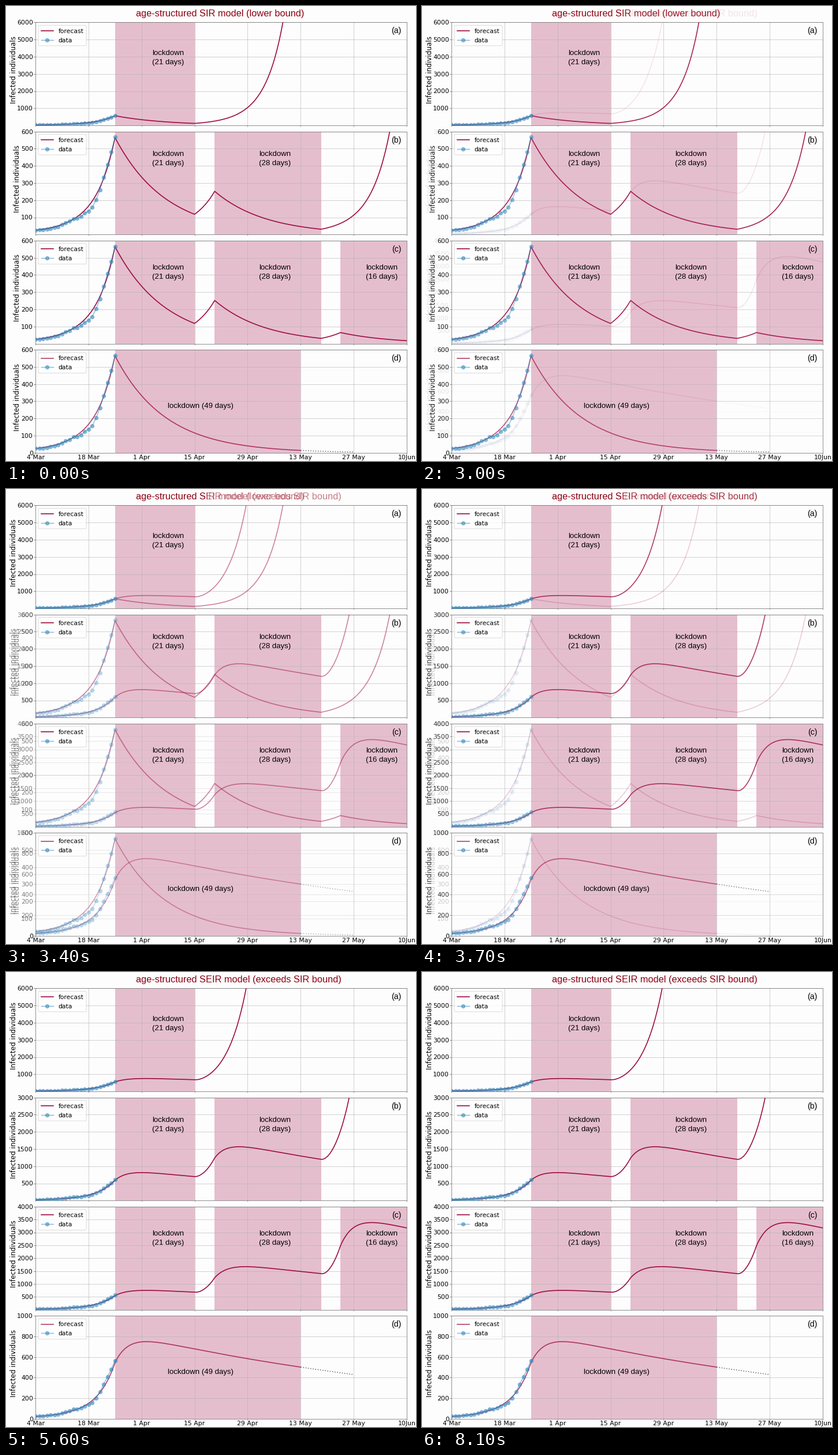
Recreate the animation shown at these times as a matplotlib script. Size 710 by 789 pixels, loop 8200 ms.

```python
import numpy as np
import matplotlib.pyplot as plt
from matplotlib.animation import FuncAnimation
from matplotlib.patches import FancyBboxPatch

W, H, DPI = 710, 789, 100
PT = 72 / DPI  # points per pixel
LEFT, RIGHT, DAYS = 51, 694, 98
FIRST_TOP, PANEL_STEP, PANEL_H = 28.4, 189.25, 178.7
FRAMES, INTERVAL = 82, 100
FADE_START, FADE_TIME = 2900, 1000

RED, BLUE, PINK, PAPER = "#9c0c40", "#3288bd", "#e5becd", "#fefdfe"
GRID, EDGE = "#b0b0b0", "#757575"
SANS, DEJAVU = "Liberation Sans", "DejaVu Sans"
LINE_W, DATA_W, DOT, DATA_ALPHA = 1.65 * PT, 1.4 * PT, 6.4 * PT, 0.58
CASES = np.array([25, 27, 28, 31, 36, 41, 46, 57, 69, 77, 93, 94, 105, 124,
                  137, 158, 203, 260, 333, 408, 480, 567])

fig = plt.figure(figsize=(W / DPI, H / DPI), dpi=DPI, facecolor=PAPER)
fading = []


def fade(artist, model, alpha=1.0):
    """Register an artist of model 0 or 1; None means it is always shown."""
    artist.set_alpha(alpha)
    if model is not None:
        fading.append((artist, model, alpha))
    return artist


def label(x, y, text, size, font=DEJAVU, ha="center", color="black"):
    """Text whose capitals are centred on pixel row y, counted from the top."""
    return fig.text(x / W, 1 - (y + 0.36 * size) / H, text, fontsize=size * PT,
                    family=font, ha=ha, va="baseline", color=color)


# --- model curves -----------------------------------------------------------
def log_bend(t, span, v0, v1, bend=0.0):
    return v0 * np.exp(np.log(v1 / v0) * t / span + bend * t * (t - span))


def two_rates(t, span, v0, v1, slow, fast):
    e1, e2 = np.exp(slow * span), np.exp(-fast * span)
    p = (v1 - v0 * e2) / (e1 - e2)
    return p * np.exp(slow * t) + (v0 - p) * np.exp(-fast * t)


def curve(days, values, phase):
    xs, ys = [], []
    for i in range(len(days) - 1):
        span = days[i + 1] - days[i]
        t = np.linspace(0, span, 80)
        xs.append(days[i] + t)
        ys.append(phase(i, t, span, values[i], values[i + 1]))
    return np.concatenate(xs), np.concatenate(ys)


def sir(days, values):
    def phase(i, t, span, v0, v1):
        growth_bend = 0.0014 if i else 0.0019
        return log_bend(t, span, v0, v1, growth_bend if v1 > v0 else 0)
    return curve(days, values, phase)


def seir(days, values, locked=(-0.0108, 0.28), free=(0.19, 0.42)):
    def phase(i, t, span, v0, v1):
        if i == 0:
            return log_bend(t, span, v0, v1, 0.0022)
        return two_rates(t, span, v0, v1, *(locked if i % 2 else free))
    return curve(days, values, phase)


# --- panels -----------------------------------------------------------------
D1, D2, D3, D4, D5 = 21, 42, 47.3, 75.4, 80.5
FIRST, SECOND, THIRD = (D1, D2), (D3, D4), (D5, DAYS)

PANELS = [
    dict(name="(a)", scales=[(6000, 1000), (6000, 1000)],
         spans=[FIRST],
         curves=[sir([0, D1, D2, 65.3], [25, 565, 118, 6000]),
                 seir([0, D1, D2, 55.6], [22, 555, 680, 6000])],
         notes=[(280.8, "lockdown", 52), (280.8, "(21 days)", 68)]),
    dict(name="(b)", scales=[(600, 100), (3000, 500)],
         spans=[FIRST, SECOND],
         curves=[sir([0, D1, D2, D3, D4, 93.5], [25, 565, 118, 252, 31, 600]),
                 seir([0, D1, D2, D3, D4, 82.8],
                      [23, 590, 697, 1240, 1200, 3000],
                      (-0.0145, 0.31), (0.18, 0.36))],
         notes=[(280.8, "lockdown", 37.5), (280.8, "(21 days)", 53.5),
                (465.5, "lockdown", 37.5), (465.5, "(28 days)", 53.5)]),
    dict(name="(c)", scales=[(600, 100), (4000, 500)],
         spans=[FIRST, SECOND, THIRD],
         curves=[sir([0, D1, D2, D3, D4, D5, DAYS],
                     [25, 565, 118, 252, 31, 65, 17.5]),
                 seir([0, D1, D2, D3, D4, D5, DAYS],
                      [22, 545, 680, 1240, 1400, 2480, 3173])],
         notes=[(280.8, "lockdown", 45), (280.8, "(21 days)", 61),
                (465.5, "lockdown", 45), (465.5, "(28 days)", 61),
                (650.5, "lockdown", 45), (650.5, "(16 days)", 61)]),
    dict(name="(d)", scales=[(600, 100), (1000, 200)],
         spans=[(D1, 70)],
         curves=[sir([0, D1, 70], [25, 565, 14]),
                 seir([0, D1, 70], [22, 545, 502])],
         notes=[(337, "lockdown (49 days)", 96.3)]),
]
TAILS = [(14, 5), (502, 430)]


def draw_scale(ax, panel, top):
    """Horizontal grid, ticks and numbers; parts common to both models stay."""
    marks = []
    for limit, step in panel["scales"]:
        start = 0 if panel["name"] == "(d)" else step
        marks.append({(round(v / limit, 4), str(v))
                      for v in range(start, limit + 1, step)})
    places = [{f for f, _ in m} for m in marks]

    for f in places[0] | places[1]:
        model = None if f in places[0] & places[1] else int(f in places[1])
        grid, = ax.plot([0, DAYS], [f, f], color=GRID, lw=0.8 * PT,
                        zorder=1.5)
        tick, = ax.plot([-0.4, 0], [f, f], color=EDGE, lw=0.8 * PT,
                        clip_on=False, zorder=2.4)
        fade(grid, model, 0.7)
        fade(tick, model)
    for f, number in marks[0] | marks[1]:
        shared = (f, number) in marks[0] & marks[1]
        model = None if shared else int((f, number) in marks[1])
        y = top + PANEL_H * (1 - f)
        fade(label(47, y, number, 10.9, ha="right"), model)

    columns = [13.5 if limit >= 1000 else 20 for limit, _ in panel["scales"]]
    models = [None] if columns[0] == columns[1] else [0, 1]
    for model, x in zip(models, columns):
        fade(fig.text(x / W, 1 - (top + 82) / H, "Infected individuals",
                      rotation=90, fontsize=11.9 * PT, family=DEJAVU,
                      ha="center", va="center"), model)


def draw_legend(ax, top, line_alpha):
    def at(x, y):
        return (x - LEFT) / (RIGHT - LEFT) * DAYS, 1 - y / PANEL_H

    box = FancyBboxPatch((58, H - top - 38.5), 79, 31.5,
                         boxstyle="round,pad=2,rounding_size=2",
                         transform=None, fc=(1, 1, 1, 0.8), ec="#d4d4d4",
                         lw=0.8 * PT, zorder=5)
    ax.add_patch(box)
    (x0, y0), (x1, y1) = at(60.5, 14.4), at(82, 30.3)
    mid = at(71.2, 30.3)[0]
    ax.plot([x0, x1], [y0, y0], color=RED, lw=LINE_W, alpha=line_alpha,
            zorder=6)
    ax.plot([x0, x1], [y1, y1], color=BLUE, lw=DATA_W, alpha=DATA_ALPHA,
            zorder=6)
    ax.plot([mid], [y1], "o", color=BLUE, ms=DOT, mew=0.8 * PT,
            alpha=DATA_ALPHA, zorder=6)
    label(90.5, top + 14.4, "forecast", 10.7, ha="left")
    label(90.5, top + 30.3, "data", 10.7, ha="left")


def draw_panel(panel, top):
    last = panel["name"] == "(d)"
    ax = fig.add_axes([LEFT / W, 1 - (top + PANEL_H) / H,
                       (RIGHT - LEFT) / W, PANEL_H / H], facecolor=PAPER)
    ax.set_xlim(0, DAYS)
    ax.set_ylim(0, 1)
    ax.set_autoscale_on(False)
    ax.set_yticks([])
    ax.set_xticks(range(0, DAYS + 1, 14), [""] * 8)
    ax.tick_params(length=2.5 * PT, width=0.8 * PT, color=EDGE)
    for spine in ax.spines.values():
        spine.set(color=EDGE, linewidth=0.8 * PT)

    for start, end in panel["spans"]:
        ax.axvspan(start, end, color=PINK, lw=0, zorder=1)
    for day in range(14, DAYS, 14):
        ax.axvline(day, color=GRID, lw=0.8 * PT, alpha=0.7, zorder=1.5)
    draw_scale(ax, panel, top)

    line_alpha = 0.78 if last else 1.0
    same_scale = panel["scales"][0] == panel["scales"][1]
    for model, (x, y) in enumerate(panel["curves"]):
        limit = panel["scales"][model][0]
        line, = ax.plot(x, y / limit, color=RED, lw=LINE_W, zorder=3)
        fade(line, model, line_alpha)
        if last:
            t = np.linspace(0, 14, 30)
            tail, = ax.plot(70 + t, log_bend(t, 14, *TAILS[model]) / limit,
                            ":", color="#707070", lw=1.6 * PT, zorder=3)
            fade(tail, model)
        if same_scale and model:
            continue
        factor = 1.07 if limit == 3000 else 1
        dots, = ax.plot(np.arange(22), CASES * factor / limit, "o-",
                        color=BLUE, lw=DATA_W, ms=DOT, mew=0.8 * PT, zorder=4)
        fade(dots, None if same_scale else model, DATA_ALPHA)

    draw_legend(ax, top, line_alpha)
    for x, text, dy in panel["notes"]:
        label(x, top + dy, text, 13.2, SANS)
    label(676, top + 14, panel["name"], 14, SANS)


for n, spec in enumerate(PANELS):
    draw_panel(spec, FIRST_TOP + n * PANEL_STEP)

DATES = ["4 Mar", "18 Mar", "1 Apr", "15 Apr", "29 Apr", "13 May", "27 May",
         "10Jun"]
for n, date in enumerate(DATES):
    label(LEFT + n * (RIGHT - LEFT) / 7, 782.5, date, 10.9)

TITLE = dict(size=16.4, font=SANS, ha="left", color="#8b0010")
label(225, 12.2, "age-structured S", **TITLE)
for n, ending in enumerate(["IR model (lower bound)",
                            "EIR model (exceeds SIR bound)"]):
    fade(label(346.5, 12.2, ending, **TITLE), n)


# --- cross-fade -------------------------------------------------------------
def update(frame):
    mix = min(max((frame * INTERVAL - FADE_START) / FADE_TIME, 0), 1)
    for artist, model, alpha in fading:
        weight = mix if model else 1 - mix
        artist.set_visible(weight > 0)
        artist.set_alpha(alpha * weight)
    return [artist for artist, _, _ in fading]


update(0)
animation = FuncAnimation(fig, update, frames=FRAMES, interval=INTERVAL,
                          repeat=True, repeat_delay=0, blit=False)
plt.show()
```
